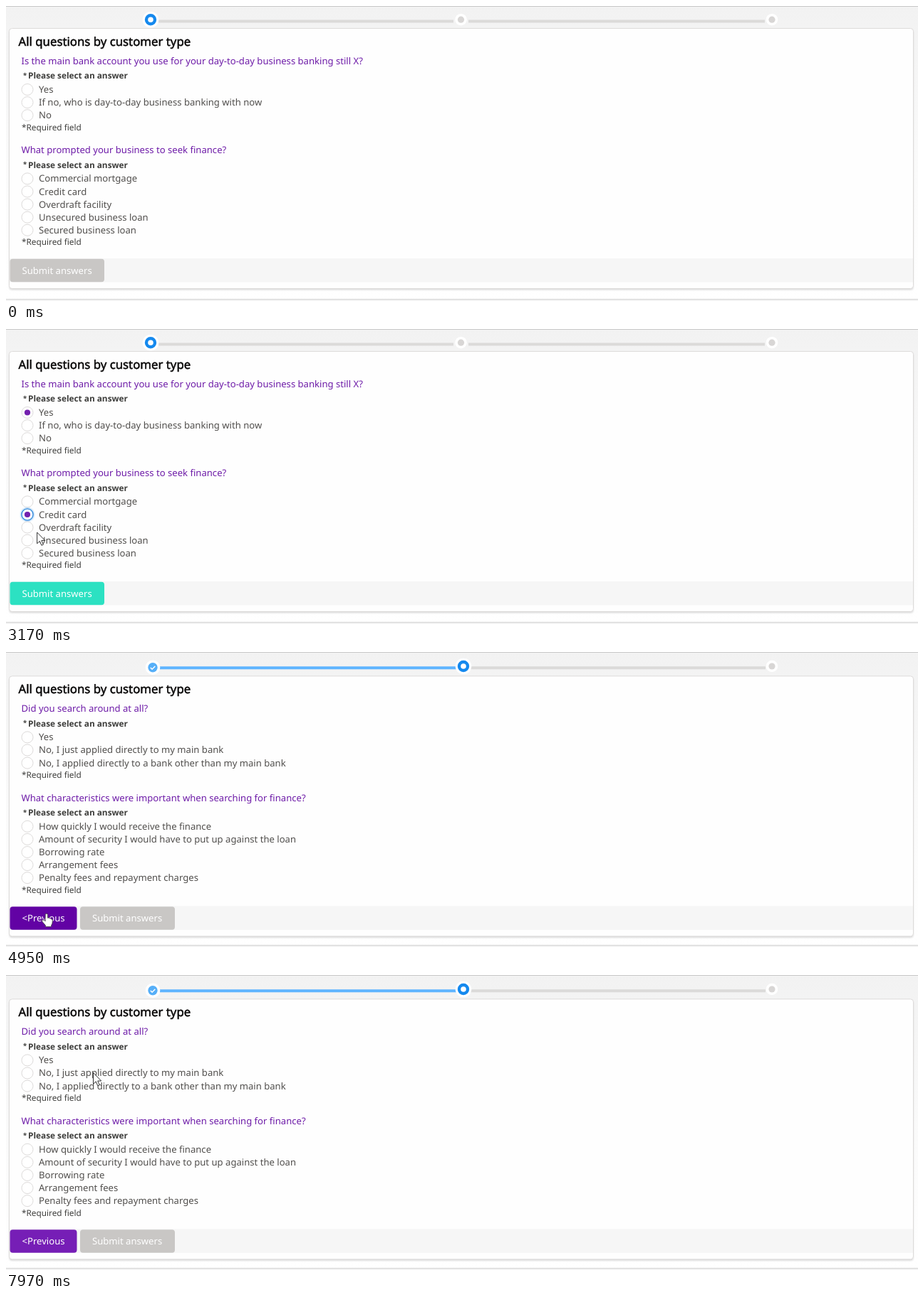
An HTML page for the animation above (8 s loop, 1280 by 415 pixels).

```html
<!DOCTYPE html>
<html lang="en">
<head>
<meta charset="utf-8">
<title>Customer questions</title>
<style>
  html, body { margin: 0; width: 100%; height: 100%; overflow: hidden; background: #fff; }
  svg { display: block; width: 100vw; height: 100vh; }
  text { font: 13.1px "Noto Sans", "Open Sans", sans-serif; fill: #514f4d; text-rendering: geometricPrecision; }
  .title { font-size: 16.8px; fill: #080707; stroke: #080707; stroke-width: .5px; }
  .question { fill: #6e1ca8; }
  .prompt, .star { font-size: 11.82px; font-weight: 700; fill: #3e3e3c; }
  .star { font-size: 9.5px; }
  .required { font-size: 11.8px; fill: #3e3e3c; }
  .label { fill: #fff; }
</style>
</head>
<body>
<svg id="stage" viewBox="0 0 1280 415" preserveAspectRatio="none"></svg>
<script>
const LOOP = 8000, STEP = 70, ROW = 18.1, SHIFT = 2.4;
const GREY = [201, 199, 197], GREEN = [44, 225, 194], PURPLE = [118, 30, 182], DARK = [98, 2, 164];

// Moments of the visitor's actions.
const PICK_YES = 1080, PICK_CREDIT = 2560, PRESS = 4540, NEXT_PAGE = 4880;

// Each move continues from the end of the last one; a higher power brakes harder.
const ENTRY = { x: 965, y: 385 };
const moves = [
  { start: 70, time: 210, x: 76, y: 115 },
  { start: 540, time: 210, x: 59, y: 116 },
  { start: 1740, time: 560, x: 59, y: 249, power: 2 },
  { start: 3030, time: 840, x: 57, y: 368, power: 2, via: { x: 22, y: 309 } },
  { start: 5280, time: 840, x: 625, y: 33, power: 1.32, via: { x: 171, y: 28 } },
  { start: 6120, time: 420, x: 638, y: 29 },
  { start: 7130, time: 840, x: 122, y: 137, power: 1.2 }
];

const text = (x, y, cls, str) => `<text x="${x}" y="${y}" class="${cls}">${str}</text>`;
const circle = (x, y, r, fill, extra = '') => `<circle cx="${x}" cy="${y}" r="${r}" fill="${fill}" ${extra}/>`;
const rect = (x, y, w, h, fill, extra = '') => `<rect x="${x}" y="${y}" width="${w}" height="${h}" fill="${fill}" ${extra}/>`;

function radio(y, id) {
  const base = circle(30, y, 8, '#fff', 'stroke="#dddbda"');
  if (!id) return base;
  return base +
    `<g id="${id}Ring">${circle(30, y, 8, '#fff', 'stroke="#1589ee" stroke-width="2.4" filter="url(#glow)" opacity=".6"')}` +
    `${circle(30, y, 8, '#fff', 'stroke="#1b7fd6" stroke-width="1.1"')}</g>` +
    circle(30, y, 4.1, '#7320ae', `id="${id}Dot"`);
}

// One question: heading, prompt, radio options, required note.
function group(top, question, options, picked) {
  const rows = options.map((label, i) => {
    const y = top + 40.5 + i * ROW;
    return radio(y, picked && label.startsWith(picked.label) && picked.id) + text(46, y + 4.5, '', label);
  });
  return text(21.5, top + 4.8, 'question', question) +
    text(24, top + 24, 'star', '*') + text(31, top + 25.2, 'prompt', 'Please select an answer') +
    rows.join('') + text(22, top + 43.5 + options.length * ROW, 'required', '*Required field');
}

function card(groups) {
  return rect(4.5, 33.5, 1269, 366, '#000', 'rx="4" opacity=".14" filter="url(#soft)"') +
    rect(4.5, 31.5, 1269, 366, '#fefefe', 'rx="4" stroke="#dddbda"') +
    rect(5, 355, 1268, 33.5, '#f6f6f6') +
    text(17.5, 56, 'title', 'All questions by customer type') + groups;
}

const button = (id, x, w, label) =>
  rect(x, 355.8, w, 32.5, `rgb(${GREY})`, `rx="4" id="${id}"`) + text(x + 17, 376.5, 'label', label);

const line = (x1, x2, y, color) => rect(x1, y - 2, x2 - x1, 4, color);
const dot = (x, y) => circle(x, y, 8.3, '#fff') + circle(x, y, 4.6, '#d8d6d5');
const active = (x, y, id) => circle(x, y, 11.3, '#fff') +
  circle(x, y, 6, '#fff', `id="${id}" stroke="#1589ee" stroke-width="4.4"`);

const pageOne =
  line(214, 628, 21.5, '#dbdad9') + line(649, 1065, 21.5, '#dbdad9') +
  active(203, 19.2, 'stepOne') + dot(638.5, 19.2) + dot(1075, 19.2) +
  card(
    group(77, 'Is the main bank account you use for your day-to-day business banking still X?',
      ['Yes', 'If no, who is day-to-day business banking with now', 'No'],
      { label: 'Yes', id: 'yes' }) +
    group(202.4, 'What prompted your business to seek finance?',
      ['Commercial mortgage', 'Credit card', 'Overdraft facility', 'Unsecured business loan', 'Secured business loan'],
      { label: 'Credit', id: 'credit' })) +
  rect(5.5, 356, 132.5, 32.5, '#2f8fe0', 'rx="4" id="focus" filter="url(#glow)" stroke="#2f8fe0" stroke-width="2"') +
  button('submit', 5.5, 132.5, 'Submit answers');

const pageTwo =
  line(216, 633, 22.3, '#5eb4ff') + line(652, 1066, 22.3, '#dbdad9') +
  circle(206, 21.8, 10.3, '#fff') + circle(206, 21.8, 6.7, '#56aff8') +
  '<path d="M202.8 22l2.3 2.3 4.2-4.4" fill="none" stroke="#fff" stroke-width="1.5"/>' +
  active(642, 20, 'stepTwo') + dot(1075, 20) +
  '<path id="tip" d="M633.5 0h14.5l-7.2 5.8z" fill="#16325c"/>' +
  `<g transform="translate(0 ${SHIFT})">` + card(
    group(77, 'Did you search around at all?',
      ['Yes', 'No, I just applied directly to my main bank', 'No, I applied directly to a bank other than my main bank']) +
    group(202.4, 'What characteristics were important when searching for finance?',
      ['How quickly I would receive the finance', 'Amount of security I would have to put up against the loan',
       'Borrowing rate', 'Arrangement fees', 'Penalty fees and repayment charges'])) +
  button('previous', 5.5, 94, '&lt;Previous') + button('submitTwo', 104, 133, 'Submit answers') + '</g>';

const pointer =
  '<path id="arrow" d="M.5 .5v15.8l3.7-3.4 2.6 5.9 2.5-1.1-2.6-5.7h5z" fill="#fff" stroke="#333"/>' +
  '<path id="hand" d="M-1.8 10.5V1.6Q-1.8 0-.2 0T1.4 1.6V6.2Q3.6 5 4.3 6.9 6 6 6.6 7.8 8.2 7.2 8.2 9.2V12Q8.2 14.6 6.6 16.4V18.4H-1.6V16.6L-6 11.4Q-7.4 9.2-5.2 8.8-3.8 8.8-1.8 10.5Z" fill="#fff" stroke="#333" stroke-width=".8"/>';

const stage = document.getElementById('stage');
stage.innerHTML = `<defs>
    <linearGradient id="sky" x2="0" y2="1"><stop offset="0" stop-color="#f2f2f2"/><stop offset=".5" stop-color="#fafafa"/><stop offset="1" stop-color="#fff"/></linearGradient>
    <filter id="glow" x="-50%" y="-50%" width="200%" height="200%"><feGaussianBlur stdDeviation="1.2"/></filter>
    <filter id="soft" x="-5%" y="-5%" width="110%" height="110%"><feGaussianBlur stdDeviation="1"/></filter>
  </defs>` +
  rect(0, 0, 1280, 415, 'url(#sky)') + rect(0, 0, 1280, 1, '#c8c8c8') +
  rect(0, 412, 1280, 1.5, '#d6d6d6') + rect(0, 413.5, 1280, 1.5, '#f3f3f3') +
  `<g id="pageOne">${pageOne}</g><g id="pageTwo">${pageTwo}</g><g id="pointer">${pointer}</g>`;

const el = {};
stage.querySelectorAll('[id]').forEach(node => el[node.id] = node);

// Progress from 0 to 1, advancing once every STEP ms.
function progress(t, start, time) {
  const elapsed = Math.floor((t - start) / STEP) * STEP;
  return Math.min(1, Math.max(0, elapsed / time));
}

const mix = (a, b, p) => a.map((v, i) => Math.round(v + (b[i] - v) * p));
const show = (node, on) => node.setAttribute('visibility', on ? 'inherit' : 'hidden');
const paint = (node, color) => node.setAttribute('fill', `rgb(${color})`);

function pointerAt(t) {
  let from = ENTRY;
  for (const to of moves) {
    const u = progress(t, to.start, to.time);
    if (u < 1) {
      const p = 1 - (1 - u) ** (to.power || 1);
      const along = axis => {
        const mid = to.via ? to.via[axis] : (from[axis] + to[axis]) / 2;
        return (1 - p) ** 2 * from[axis] + 2 * p * (1 - p) * mid + p * p * to[axis];
      };
      return { x: along('x'), y: along('y') };
    }
    from = to;
  }
  return from;
}

function submitColor(t) {
  const ready = mix(GREY, GREEN, progress(t, PICK_CREDIT, 280));
  const hover = mix(ready, PURPLE, progress(t, 3310, 280));
  return mix(hover, DARK, progress(t, PRESS - STEP, 210));
}

function draw(t) {
  show(el.pageOne, t < NEXT_PAGE);
  show(el.pageTwo, t >= NEXT_PAGE);

  show(el.yesRing, t >= PICK_YES && t < PICK_CREDIT);
  show(el.yesDot, t >= PICK_YES + STEP && t < NEXT_PAGE);
  show(el.creditRing, t >= PICK_CREDIT && t < PRESS);
  show(el.creditDot, t >= PICK_CREDIT + STEP && t < NEXT_PAGE);
  show(el.focus, t >= PRESS && t < NEXT_PAGE);
  paint(el.submit, submitColor(t));
  paint(el.previous, mix(DARK, PURPLE, progress(t, 5280, 280)));

  const hover = t >= 6330 && t < 7200;
  el.stepTwo.setAttribute('stroke', hover ? '#0070d2' : '#1589ee');
  el.tip.setAttribute('opacity', progress(t, 6260, 210) - progress(t, 7130, 140));

  const { x, y } = pointerAt(t);
  const present = t >= moves[0].start;
  const onButton = x < 138 && y > 356;
  show(el.arrow, present && !onButton);
  show(el.hand, present && onButton);
  el.pointer.setAttribute('transform', `translate(${x.toFixed(2)} ${y.toFixed(2)})`);
}

const begin = performance.now();
function tick() {
  draw((performance.now() - begin) % LOOP);
  requestAnimationFrame(tick);
}
tick();
</script>
</body>
</html>
```
